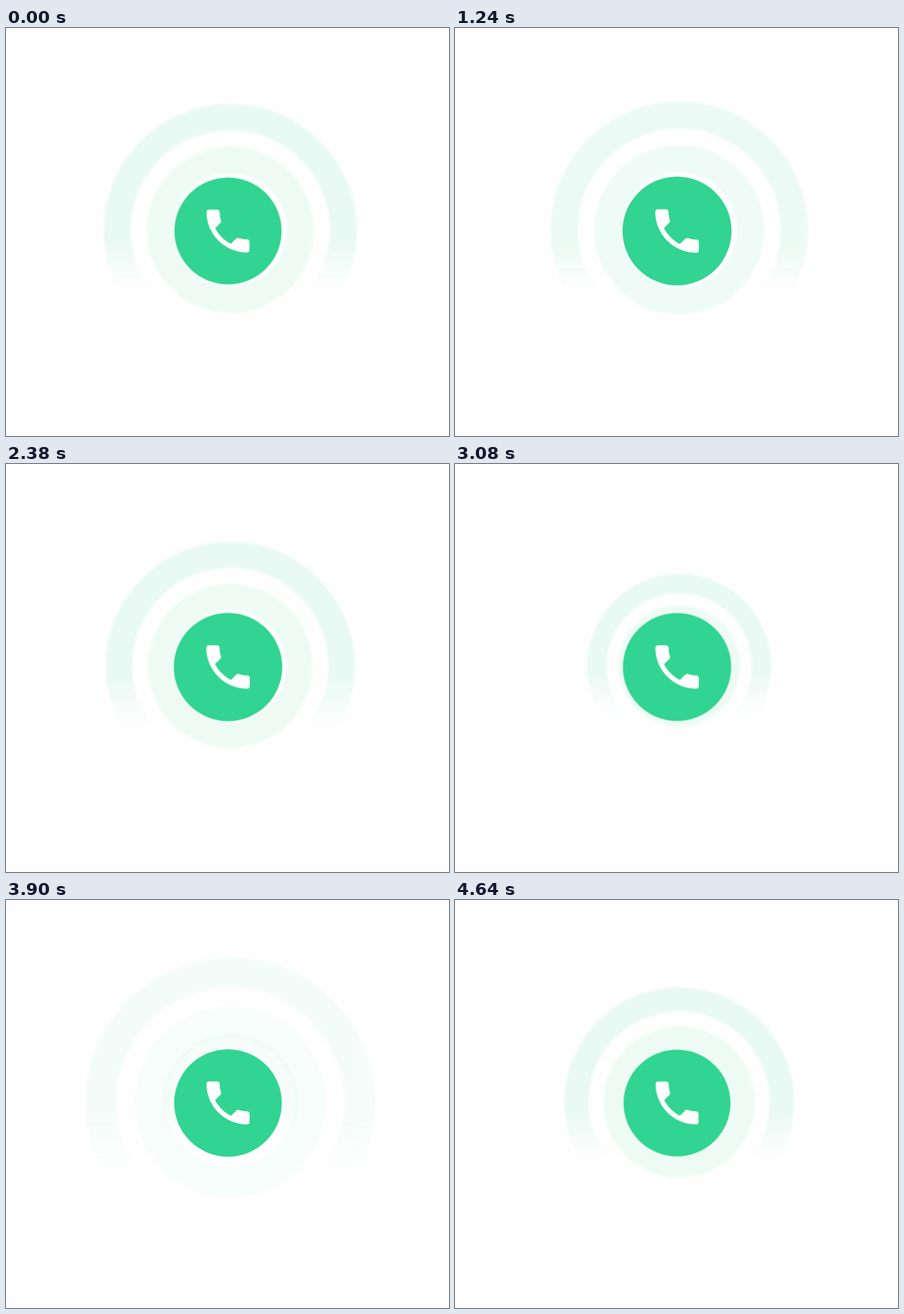
These frames come from a looping animation (650 by 600 pixels, 4.66 s). An HTML page without scripts:

```html
<!DOCTYPE html>
<html lang="en">
<head>
<meta charset="utf-8">
<title>Incoming call</title>
<style>
  @property --t {
    syntax: "<number>";
    inherits: true;
    initial-value: 0;
  }

  html, body {
    margin: 0;
    width: 100%;
    height: 100%;
    overflow: hidden;
    background: #fefefe;
  }

  svg {
    display: block;
    width: 650px;
    height: 600px;
    /* --t is the elapsed time in ms */
    animation: clock 4660ms steps(233) infinite;
  }

  @keyframes clock {
    from { --t: 0; }
    to { --t: 4660; }
  }

  .pulses {
    transform: translate(329px, 297px);
    filter: blur(1.8px);
  }

  /* Each pulse follows the one before by 1205 ms, growing steadily, then fading */
  .pulse {
    --age: calc(var(--t) + 930 - 1205 * var(--n));
    transform: scale(max(0, calc(.98 + .00094 * var(--age))));
    opacity: clamp(0, min(calc((var(--age) + 150) / 350), calc((1480 - var(--age)) / 560)), 1);
  }

  .button {
    transform-origin: 325.75px 298.5px;
    animation: breathe 4660ms linear infinite;
  }

  @keyframes breathe {
    0% { transform: scale(.983); }
    13% { transform: scale(.988); }
    27% { transform: scale(1); }
    51% { transform: scale(.995); }
    66% { transform: scale(.993); }
    84% { transform: scale(.987); }
    100% { transform: scale(.981); }
  }
</style>
</head>
<body>
<svg viewBox="0 0 650 600" role="img" aria-label="Ringing phone">
  <defs>
    <linearGradient id="fade" x2="0" y2="1">
      <stop offset=".55" stop-color="#31d491" stop-opacity=".1"/>
      <stop offset=".78" stop-color="#31d491" stop-opacity="0"/>
    </linearGradient>
    <g id="rings" fill="none" stroke-width="21">
      <circle r="89.5" stroke="url(#fade)"/>
      <circle r="55.5" stroke="#31d491" stroke-opacity=".08"/>
    </g>
  </defs>

  <g class="pulses">
    <use class="pulse" href="#rings" style="--n:0"/>
    <use class="pulse" href="#rings" style="--n:1"/>
    <use class="pulse" href="#rings" style="--n:2"/>
    <use class="pulse" href="#rings" style="--n:3"/>
    <use class="pulse" href="#rings" style="--n:4"/>
  </g>

  <g class="button">
    <circle cx="325.75" cy="298.5" r="80" fill="#31d491"/>
    <path fill="#fff" transform="translate(325.75 298.5) scale(3.56) translate(-12 -12)"
      d="M6.62 10.79c1.44 2.83 3.76 5.14 6.59 6.59l2.2-2.2c.27-.27.67-.36 1.02-.24 1.12.37 2.33.57 3.57.57.55 0 1 .45 1 1V20c0 .55-.45 1-1 1C10.61 21 3 13.39 3 4c0-.55.45-1 1-1h3.5c.55 0 1 .45 1 1 0 1.25.2 2.45.57 3.57.11.35.03.74-.25 1.02z"/>
  </g>
</svg>
</body>
</html>
```
